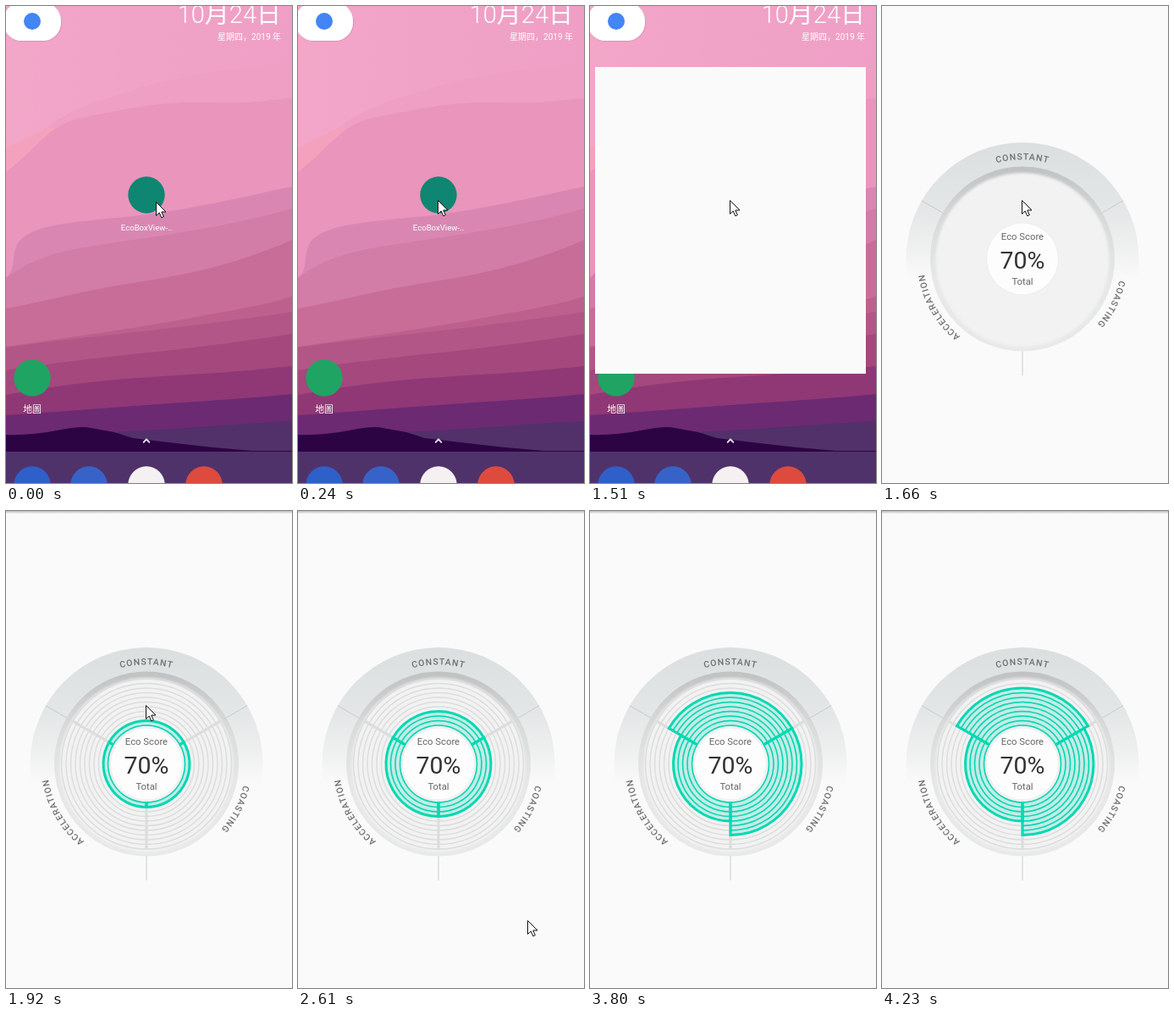
These frames come from a looping animation (338 by 563 pixels, 5.1 s). An HTML page:

```html
<!DOCTYPE html>
<html lang="zh-CN">
<head>
<meta charset="utf-8">
<title>Eco score</title>
<style>
  html, body { margin: 0; height: 100%; overflow: hidden; background: #fafafa; }
  svg { display: block; width: 338px; height: 563px; font-family: Roboto, "Noto Sans CJK SC", "Noto Sans CJK", sans-serif; }
  .white { fill: #fff; }
  .mid { text-anchor: middle; }
  .arc { font-size: 10.5px; font-weight: 500; letter-spacing: 1px; fill: #707070; text-anchor: middle; }
</style>
</head>
<body>
<svg viewBox="0 0 338 563">
  <defs>
    <linearGradient id="sky">
      <stop offset="0" stop-color="#f2a6c8"/><stop offset="1" stop-color="#ef9fc5"/>
    </linearGradient>
    <linearGradient id="rim" gradientUnits="userSpaceOnUse" x1="166" y1="161" x2="166" y2="322">
      <stop offset="0" stop-color="#dcdfe0"/><stop offset=".45" stop-color="#e3e6e6"/>
      <stop offset=".8" stop-color="#f0f1f1"/><stop offset="1" stop-color="#fafafa"/>
    </linearGradient>
    <linearGradient id="bevel" x2="0" y2="1">
      <stop offset="0" stop-color="#bfc1c2"/><stop offset=".3" stop-color="#d9dbdb"/>
      <stop offset=".6" stop-color="#e6e7e7"/><stop offset="1" stop-color="#e8eaea"/>
    </linearGradient>
    <linearGradient id="bar" x2="0" y2="1">
      <stop offset="0" stop-color="#bcbcbc"/><stop offset="1" stop-color="#fafafa"/>
    </linearGradient>
    <filter id="soft"><feGaussianBlur stdDeviation="1.6"/></filter>
    <path id="lane" d="M166 415.700a117.200 117.200 0 0 1 0-234.400a117.200 117.200 0 0 1 0 234.400"/>
  </defs>

  <g id="home">
    <rect width="338" height="563" fill="url(#sky)"/>
    <g id="bands"></g>
    <rect y="526" width="338" height="37" fill="#50326a"/>
    <rect x="-3" y="-3" width="69" height="45" rx="22" fill="#a05080" opacity=".25"/>
    <rect x="-3" y="-4" width="68" height="45" rx="21" class="white"/>
    <circle cx="31" cy="18" r="10" fill="#4285f4"/>
    <g class="white">
      <text x="325" y="19.500" text-anchor="end" font-size="29" font-weight="300">10月24日</text>
      <text x="325" y="40" text-anchor="end" font-size="10">星期四，2019 年</text>
      <text x="166" y="264.500" class="mid" font-size="9.600">EcoBoxView-..</text>
      <text x="31" y="480" class="mid" font-size="10.800" font-weight="500">地圖</text>
    </g>
    <path d="M162.200 515.300L166 511.500L169.800 515.300" fill="none" stroke="#fff" stroke-width="1.700"/>
    <g id="icons"></g>
    <g id="press">
      <rect x="142" y="200" width="47.500" height="47" fill="#f0c4da"/>
      <circle cx="166" cy="223" r="21.700" fill="#a6d4cb"/>
    </g>
    <rect id="panel" x="6" y="72" width="320" height="362" fill="#fafafa"/>
  </g>

  <g id="app">
    <rect width="338" height="563" fill="#fafafa"/>
    <rect id="shade" width="338" height="3.500" fill="url(#bar)"/>
    <circle cx="166" cy="298.500" r="137.500" fill="url(#rim)"/>
    <circle cx="166" cy="298.500" r="109" fill="url(#bevel)"/>
    <circle cx="166" cy="299.500" r="102.500" fill="#f2f2f2" filter="url(#soft)"/>
    <g id="ticks" stroke="#c9cbcb"></g>
    <g id="grid" fill="none" stroke="#dcdddd"></g>
    <g id="score" fill="none" stroke="#00d8b2"></g>
    <circle cx="166" cy="298.500" r="43" fill="#eee"/>
    <circle cx="166" cy="298.500" r="42" fill="#fdfdfd"/>
    <g class="mid">
      <text x="166" y="276" font-size="11.300" fill="#666">Eco Score</text>
      <text x="166" y="309.500" font-size="28.500" fill="#333">70%</text>
      <text x="166" y="329" font-size="11.300" fill="#666">Total</text>
    </g>
    <text class="arc"><textPath href="#lane" startOffset="16.700%">ACCELERATION</textPath></text>
    <text class="arc"><textPath href="#lane" startOffset="50%">CONSTANT</textPath></text>
    <text class="arc"><textPath href="#lane" startOffset="82.500%">COASTING</textPath></text>
  </g>

  <path id="cursor" d="M.5 .5V16.500L4.200 13L6.800 18.800L9.300 17.700L6.800 12H12Z" fill="#fff" stroke="#111"/>
</svg>
<script>
const $ = id => document.getElementById(id);
const LOOP = 5100, CX = 166, CY = 298.5;
const radius = k => 45.5 + 5.5 * k;

// Wallpaper layers, back to front: colour and upper edge
const bands = [
  ['#ee9fc3', 'M0 186C40 150 60 128 110 112S200 78 338 69'],
  ['#f4a1bd', 'M0 168L54 141L100 180L0 200'],
  ['#e995bc', 'M0 196C40 165 50 140 90 132S180 112 240 114S310 110 338 109'],
  ['#d987b2', 'M0 321C14 310 4 288 18 275S60 256 130 250S270 228 338 213'],
  ['#d27ca8', 'M0 321C30 298 60 290 110 282S260 262 338 239'],
  ['#c86d97', 'M0 357C60 346 90 336 150 327S270 306 338 276'],
  ['#bd608d', 'M0 402C80 390 150 381 220 368S300 354 338 343'],
  ['#b25687', 'M0 403C80 392 150 386 220 377S300 367 338 361'],
  ['#a4487d', 'M0 430C60 421 100 416 160 410S280 396 338 387'],
  ['#8f3875', 'M0 459C60 447 130 440 200 436S290 430 338 425'],
  ['#6c2a73', 'M0 483C60 479 110 475 180 470S290 463 338 458'],
  ['#523069', 'M0 512C60 506 130 503 180 500S290 492 338 490'],
  ['#2d0443', 'M0 506Q30 507 60 501T100 498L128 503L150 510L200 516L245 521L290 525H338']
];
$('bands').innerHTML = bands.map(([c, d]) => `<path fill="${c}" d="${d}V563H0Z"/>`).join('');

const icons = [
  [166, 223, '#0e8672'], [31, 439, '#1fa463'], [31, 565, '#2f5fc9'],
  [98, 565, '#3763c8'], [166, 565, '#f5f1f3'], [234, 565, '#dd4b3e']
];
$('icons').innerHTML = icons.map(([x, y, c]) => `<circle cx="${x}" cy="${y}" r="21.7" fill="${c}"/>`).join('');

const polar = (r, deg) => {
  const a = deg * Math.PI / 180;
  return `${CX + r * Math.cos(a)} ${CY + r * Math.sin(a)}`;
};
const spoke = (r1, r2, deg) => `M${polar(r1, deg)}L${polar(r2, deg)}`;
const arc = (r, deg) => `M${polar(r, deg)}A${r} ${r} 0 0 1 ${polar(r, deg + 120)}`;
const spokes = (r1, r2) => [-30, 90, 210].map(a => spoke(r1, r2, a)).join('');

$('ticks').innerHTML = `<path d="${spokes(109, 137.5)}"/>`;
let rings = `<path d="${spokes(44, 100.5)}" stroke-width="3.2"/>`;
for (let k = 0; k <= 10; k++)
  rings += `<circle cx="${CX}" cy="${CY}" r="${radius(k)}" stroke-width="1.5"/>`;
$('grid').innerHTML = rings;

// One filled sector, k rings high
function sector(start, k) {
  const r = radius(k), r0 = radius(0), end = start + 120;
  const edge = `M${polar(r0, start)}L${polar(r, start)}A${r} ${r} 0 0 1 ${polar(r, end)}L${polar(r0, end)}`;
  let lines = '';
  for (let i = 0; i < k; i++) lines += arc(radius(i), start);
  return `<path d="${edge}A${r0} ${r0} 0 0 0 ${polar(r0, start)}Z" fill="#00d8b2" fill-opacity=".2" stroke="none"/>
    <path d="${lines}" stroke-width="1.5"/><path d="${edge}" stroke-width="3"/>`;
}
const sectors = [[90, 4], [-30, 7], [-150, 8]];

const levelTimes = [1920, 2190, 2610, 2850, 3130, 3520, 3800, 4230];
const cursorSteps = [
  [0, 177, 231], [120, 171, 232], [240, 165, 229], [2190, 198, 263], [2340, 222, 314],
  [2460, 242, 361], [2610, 271, 483], [3000, 283, 520], [3130, 294, 554], [3270, 400, 600]
];
const show = (id, on) => $(id).style.display = on ? '' : 'none';
let drawn = -1;

function render(t) {
  show('home', t < 1660);
  show('app', t >= 1660);
  show('panel', t >= 1510);
  $('press').style.opacity = t < 1260 ? 0 : t < 1390 ? .4 : 1;
  show('shade', t >= 1800);
  show('grid', t >= 1800);

  const level = levelTimes.filter(s => s <= t).length;
  if (level !== drawn) {
    drawn = level;
    $('score').innerHTML = level ? sectors.map(([a, max]) => sector(a, Math.min(level, max))).join('') : '';
  }
  const [, x, y] = cursorSteps.filter(s => s[0] <= t).pop();
  $('cursor').setAttribute('transform', `translate(${x} ${y})`);
}

const begin = performance.now();
function frame() {
  render((performance.now() - begin) % LOOP);
  requestAnimationFrame(frame);
}
frame();
</script>
</body>
</html>
```
